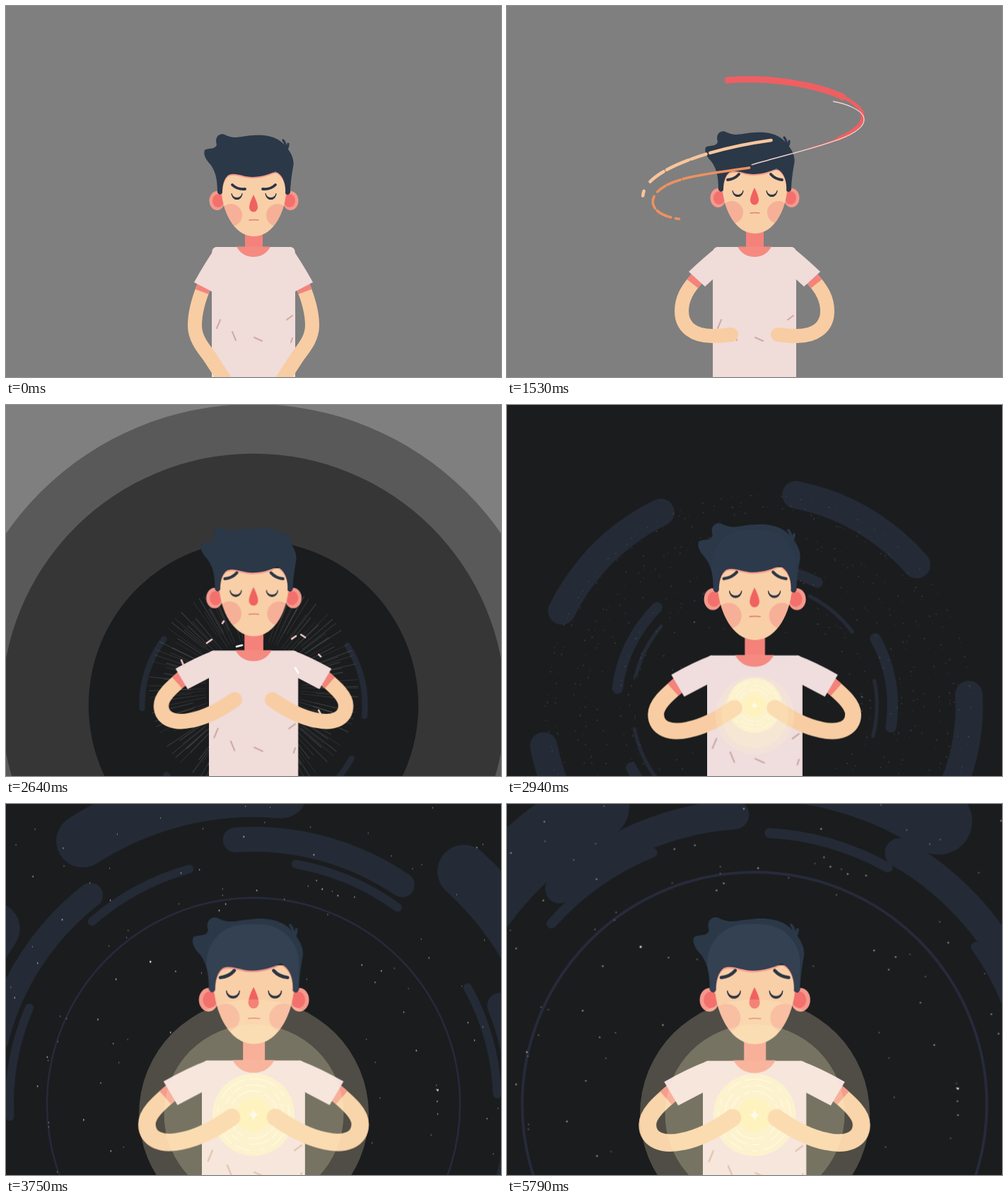
Write an HTML page without scripts that moves like this. It is 700x525 px and loops after 5.82 s.

```html
<!DOCTYPE html>
<html lang="en">
<head>
<meta charset="utf-8">
<title>Inner light</title>
<style>
html, body { margin: 0; width: 100%; height: 100%; overflow: hidden; background: #7f7f7f; }
svg { display: block; width: 100vw; height: 100vh; }
svg * { animation: 5.82s linear infinite; }
.line { fill: none; stroke-linecap: round; }
.space { transform-origin: 350px 425px; }

/* darkness spreading */
.dark1 { fill: #595959; animation-name: dark1; }
.dark2 { fill: #363636; animation-name: dark2; }
.dark3 { fill: #1a1c1e; animation-name: dark3; }
@keyframes dark1 { 0%, 40.5% { r: 0 } 45.36% { r: 425px } 48.5%, 100% { r: 640px } }
@keyframes dark2 { 0%, 41.3% { r: 0 } 45.36% { r: 355px } 49.5%, 100% { r: 640px } }
@keyframes dark3 { 0%, 42.3% { r: 0 } 45.36% { r: 232px } 51.5%, 100% { r: 640px } }

/* orbiting arcs */
.arc { stroke: #242b36; }
.arc, .ring { animation-timing-function: cubic-bezier(.33, .6, .67, .83); }
.wide { stroke-dasharray: 38 37 38 37 38 38 38 35 38 23; animation-name: wide; }
.mid { stroke-dasharray: 38 34; animation-name: mid; }
.thin { stroke-dasharray: 26.2 25.23; animation-name: thin; }
.ring { stroke: #262a3a; animation-name: ring; }
@keyframes wide {
  0%, 42.1% { r: 0; stroke-width: 0; transform: rotate(-442deg) }
  45.36% { r: 157px; stroke-width: 8px; transform: rotate(-332deg) }
  56.19% { r: 386px; stroke-width: 56px; transform: rotate(-171deg) }
  64.43% { r: 444px; stroke-width: 75px; transform: rotate(-123deg) }
  80%, 100% { r: 478px; stroke-width: 95px; transform: rotate(-95deg) }
}
@keyframes mid {
  0%, 45.36% { r: 0; stroke-width: 0; transform: rotate(-333deg) }
  56.19% { r: 305px; stroke-width: 24px; transform: rotate(-83deg) }
  64.43% { r: 375px; stroke-width: 35px; transform: rotate(-22deg) }
  80%, 100% { r: 411px; stroke-width: 42px; transform: rotate(12deg) }
}
@keyframes thin {
  0%, 45.6% { r: 0; stroke-width: 0; transform: rotate(-407deg) }
  56.19% { r: 275px; stroke-width: 8px; transform: rotate(-105.5deg) }
  64.43% { r: 345px; stroke-width: 12px; transform: rotate(-28.7deg) }
  80%, 100% { r: 384.5px; stroke-width: 14px; transform: rotate(16deg) }
}
@keyframes ring {
  0%, 56.19% { r: 225px; stroke-width: 0 }
  64.43% { r: 292px; stroke-width: 2.6px }
  80%, 100% { r: 328.5px; stroke-width: 4px }
}

/* stars */
.stars { stroke: #d9dcdc; animation-name: stars; }
.stars .d1 { stroke-dasharray: 0 71 0 133 0 38 0 157 0 96; stroke-width: 1.3; }
.stars .d2 { stroke-dasharray: 0 117 0 29 0 183 0 64 0 149; stroke-width: 1.8; }
.dust { stroke: #a5a8a5; stroke-width: 1.8; animation-name: dust; }
.dust circle { stroke-dasharray: 2 27 0 49 3 18 0 61 2 11 0 38; }
.comet { fill: #fff; animation-name: comet; }
@keyframes stars {
  0%, 45.5% { transform: scale(.3); opacity: 0 }
  51% { opacity: .8 }
  56.19% { transform: scale(.8); animation-timing-function: ease-out }
  64.43% { transform: scale(.917); opacity: 1; animation-timing-function: ease-out }
  79.9% { transform: none }
  100% { transform: scale(1.013) }
}
@keyframes dust { 0%, 47% { opacity: 0 } 52%, 57% { opacity: .85 } 62%, 100% { opacity: 0 } }
@keyframes comet {
  0%, 77.5% { transform: rotate(-24deg); opacity: 0 }
  79%, 80.3% { opacity: 1 }
  79.9% { transform: none }
  82.3%, 100% { transform: rotate(24deg); opacity: 0 }
}

/* burst around the chest */
.burst { transform-origin: 350px 400px; animation-name: burst; }
.rays { stroke: #77797a; stroke-width: 60; opacity: .38; fill: none; }
@keyframes burst {
  0%, 42% { transform: scale(.5); opacity: 0 }
  44.5% { opacity: 1 }
  45.36% { transform: none; opacity: 1 }
  50%, 100% { transform: scale(1.35); opacity: 0 }
}

/* figure */
.zoom { transform-origin: 350px 248px; animation-name: zoom; }
.head { animation-name: head; }
.low { animation-name: low; }
.lid { fill: #2b3645; stroke: #2b3645; stroke-width: 1.2; }
.brow { stroke: #2b3645; stroke-width: 3.8; animation-name: brow; }
.arm { stroke: #f8cda3; stroke-width: 20; animation-name: arm; }
.cuff { stroke: #f4837b; stroke-width: 20; stroke-dasharray: 13 999; fill: none; animation-name: arm; }
.shirt { fill: #f0dcd9; animation-name: lit; }
.sleeve { animation-name: sleeve, lit; }
.sheen { fill: #435164; animation-name: sheen; }
@keyframes zoom {
  0%, 39.5% { transform: none; animation-timing-function: cubic-bezier(.4, 0, .75, .7) }
  45.36% { transform: scale(1.07) }
  53% { transform: scale(1.178); animation-timing-function: cubic-bezier(.33, .6, .67, .9) }
  56.19% { transform: scale(1.207); animation-timing-function: cubic-bezier(.33, .7, .67, .9) }
  64.43% { transform: scale(1.236) }
  73%, 100% { transform: scale(1.24) }
}
@keyframes head {
  0%, 4% { transform: translateY(4px); animation-timing-function: ease-in-out }
  20% { transform: translateY(-2px); animation-timing-function: ease-in-out }
  26%, 100% { transform: none }
}
@keyframes low {
  0%, 5% { transform: translateY(6px); animation-timing-function: ease-in-out }
  20%, 100% { transform: none }
}
@keyframes brow {
  0%, 6% { d: path("M320 249Q327 256 338 255"); animation-timing-function: ease-in-out }
  20%, 100% { d: path("M312 246Q322 245 328 238") }
}
@keyframes arm {
  0%, 6% { d: path("M282 392C272 415 267 435 267 452C267 470 278 483 287 495C295 507 305 523 315 538"); animation-timing-function: ease-in-out }
  24%, 27% { d: path("M271 383C255 400 247 414 247 432C247 455 265 467 290 467C300 467 310 466 317 465"); animation-timing-function: ease-in-out }
  41%, 100% { d: path("M259 375C240 391 228 402 228 414C228 432 246 438 268 433C288 429 308 418 325 406") }
}
@keyframes sleeve {
  0%, 6% { d: path("M297 341Q282 362 266 391L291 404L305 370Z"); animation-timing-function: ease-in-out }
  24%, 27% { d: path("M297 341Q278 356 257 376L280 397L305 374Z"); animation-timing-function: ease-in-out }
  41%, 100% { d: path("M297 341Q275 349 247 365L263 392L305 370Z") }
}
@keyframes lit { 0%, 48% { fill: #f0dcd9 } 56%, 100% { fill: #f1deea } }
@keyframes sheen { 0%, 48% { opacity: 0 } 56%, 100% { opacity: .38 } }

/* ribbons: --l is the length, --h the head's place when fully drawn */
.ribbon { fill: none; stroke-dasharray: var(--l) 3000; animation-name: ribbon; }
.red { --h: 526; stroke: #ef5f62; }
.peach { --l: 206; --h: 332; stroke: #f8c69c; stroke-width: 4.5; stroke-dasharray: 7 16 24 5 34 4 22 6 88 3000; }
.orange { --l: 200; --h: 206; stroke: #ee9160; stroke-width: 3.6; stroke-dasharray: 5 7 22 4 18 8 14 3 20 4 95 3000; }
.pink { --l: 240; --h: 240; stroke: #f3d2cb; stroke-width: 1.3; }
@keyframes ribbon {
  0%, 15.5% { stroke-dashoffset: calc(var(--l) * 1px + 6px) }
  26.29% { stroke-dashoffset: calc((var(--l) - var(--h)) * 1px) }
  38.5%, 100% { stroke-dashoffset: calc((var(--l) - 3.1 * var(--h)) * 1px) }
}

/* light */
.core { transform-origin: 350px 403px; animation-name: core; }
.spin { transform-origin: 350px 403px; stroke: #fffdf0; stroke-width: 1.3; animation-name: spin; }
.halo { fill: #fff2c8; fill-opacity: .23; }
.h1 { animation-name: halo1; }
.h2 { animation-name: halo2; }
@keyframes core {
  0%, 46.5% { transform: scale(0); animation-timing-function: ease-out }
  54%, 100% { transform: none }
}
@keyframes spin { from { transform: none } to { transform: rotate(360deg) } }
@keyframes halo1 {
  0%, 49% { r: 0; animation-timing-function: ease-out }
  56.19% { r: 143.5px; animation-timing-function: ease-out }
  64.43%, 100% { r: 162.5px }
}
@keyframes halo2 {
  0%, 48% { r: 0; animation-timing-function: ease-out }
  56.19% { r: 122px; animation-timing-function: ease-out }
  64.43%, 100% { r: 127px }
}
</style>
</head>
<body>
<svg viewBox="0 0 700 525" preserveAspectRatio="none">
  <defs>
    <path id="face" d="M305 232V262C307 284 321 322 350.5 322C380 322 394 284 396 262V232Z"/>
    <path id="hair" d="M299 260C299 240 296 230 289 220C281 212 279 205 281 200C287 196 296 200 298 192C294 180 304 174 311 179C325 185 330 180 350 179C375 177 388 185 395 194C405 205 408 215 406 224C404 235 402 250 402 260Q399 266 395 261C396 248 392 235 381 230C372 234 362 238 348 238C335 238 325 231 315 235C308 240 306 250 306 260Q303 266 299 260Z"/>
    <path id="sweep" d="M230 300C250 260 340 230 424 203C470 190 504 175 503 155C500 125 400 98 312 105C200 115 110 150 100 200C90 270 200 300 350 310"/>
    <path id="lid" d="M319 261A7.5 8.5 0 0 0 334 261A7.5 6.6 0 0 1 319 261Z"/>
    <clipPath id="inFace"><use href="#face"/></clipPath>
    <clipPath id="inHair"><use href="#hair"/></clipPath>
    <g id="ear">
      <ellipse cx="298.5" cy="271.5" rx="11" ry="13.5" fill="#f5998d"/>
      <ellipse cx="300" cy="271.5" rx="8" ry="9.5" fill="#f3716c"/>
    </g>
  </defs>

  <rect width="700" height="525" fill="#7f7f7f"/>
  <circle class="dark1" cx="350" cy="425"/>
  <circle class="dark2" cx="350" cy="425"/>
  <circle class="dark3" cx="350" cy="425"/>

  <g class="line">
    <circle class="ring" cx="350" cy="425"/>
    <circle class="arc thin space" cx="350" cy="425" pathLength="360"/>
    <circle class="arc mid space" cx="350" cy="425" pathLength="360"/>
    <circle class="arc wide space" cx="350" cy="425" pathLength="360"/>
  </g>

  <g class="stars space line">
    <circle class="d1" cx="340" cy="415" r="205"/>
    <circle class="d2" cx="372" cy="440" r="262"/>
    <circle class="d1" cx="331" cy="402" r="301"/>
    <circle class="d1" cx="380" cy="431" r="347"/>
    <circle class="d2" cx="322" cy="447" r="388"/>
    <circle class="d1" cx="361" cy="409" r="419"/>
    <circle class="d1" cx="335" cy="428" r="463"/>
    <circle class="d2" cx="376" cy="417" r="502"/>
    <circle class="d1" cx="344" cy="436" r="547"/>
    <path stroke-width="2" d="M297 126h0M307 116h0M456 93h0M480 103h0M138 232h0M110 294h0M222 314h0M547 219h0M32 352h0M443 40h0M335 12h0M55 140h0M601 342h0M517 210h0M17 397h0M130 497h0M88 449h0M355 95h0"/>
    <path stroke="#fff" stroke-width="2.8" d="M191 205h0M634 403h0"/>
    <g class="dust">
      <circle cx="338" cy="431" r="318"/>
      <circle cx="367" cy="419" r="372"/>
      <circle cx="329" cy="412" r="441"/>
      <circle cx="371" cy="438" r="468"/>
      <circle cx="345" cy="420" r="521"/>
      <circle cx="362" cy="429" r="559"/>
    </g>
  </g>
  <path class="comet space" d="M55 224A357 357 0 0 1 152 128A560 560 0 0 0 55 224Z"/>

  <g class="burst">
    <circle class="rays" cx="350" cy="400" r="98" stroke-dasharray="1 6 .6 4 1 11 .7 5"/>
    <circle class="rays" cx="350" cy="400" r="118" stroke-dasharray=".8 9 1 17 .6 7 1 5"/>
  </g>

  <g class="zoom">
    <path d="M338 308H363V345H338Z" fill="#f4827a"/>
    <path class="shirt" d="M297 341H403Q409 342 409 350V600H291V350Q291 342 297 341Z"/>
    <path d="M326 340.5H374Q366 355 350 355Q334 355 326 340.5Z" fill="#f58a80"/>
    <path class="line" stroke="#cfaaa7" stroke-width="2" d="M303 444L298 456M320 461L325 473M351 469L362 474M397 444L405 438M405 470L403 476"/>

    <g class="core">
      <circle cx="350" cy="403" r="47" fill="#fbf2d3"/>
      <g class="spin line">
        <circle cx="350" cy="403" r="41" stroke-dasharray="17 6 31 9 5 12"/>
        <circle cx="350" cy="403" r="34" stroke-dasharray="9 5 22 13"/>
        <circle cx="350" cy="403" r="27" stroke-dasharray="25 7 6 4"/>
      </g>
      <circle cx="350" cy="403" r="19.5" fill="#fdf4b8"/>
      <path d="M350 396Q351 402 356 403Q351 404 350 410Q349 404 344 403Q349 402 350 396Z" fill="#fff"/>
    </g>

    <g>
      <path class="arm line"/>
      <path class="cuff"/>
      <path class="shirt sleeve"/>
    </g>
    <g transform="matrix(-1 0 0 1 700 0)">
      <path class="arm line"/>
      <path class="cuff"/>
      <path class="shirt sleeve"/>
    </g>

    <g class="head">
      <use href="#ear"/>
      <use href="#ear" transform="matrix(-1 0 0 1 701 0)"/>
      <use href="#face" fill="#f9cfa8"/>
      <g clip-path="url(#inFace)">
        <g fill="#f4a08f" fill-opacity=".65">
          <circle cx="318" cy="292" r="16"/>
          <circle cx="384" cy="292" r="16"/>
        </g>
        <use href="#hair" y="2" fill="#f49a8b"/>
      </g>
      <g>
        <use href="#lid" class="lid"/>
        <path class="brow line"/>
      </g>
      <g transform="matrix(-1 0 0 1 701 0)">
        <use href="#lid" class="lid"/>
        <path class="brow line"/>
      </g>
      <g class="low">
        <path d="M350 257C354 265 356 271 356 275A6 6.5 0 0 1 344 275C344 271 346 265 350 257Z" fill="#f0625f"/>
        <path class="line" d="M344 293Q350 292 357 293" stroke="#e0806f" stroke-width="1.4"/>
      </g>
      <use href="#hair" fill="#2b3848"/>
      <path class="line" d="M396 200Q396 191 392 186M396 200Q399 196 399 191" stroke="#2b3848" stroke-width="3.2"/>
      <g clip-path="url(#inHair)">
        <rect class="sheen" x="296" y="185" width="106" height="110" rx="44"/>
      </g>
    </g>
  </g>

  <g class="burst line" stroke-width="2.6" stroke="#f0c9c2">
    <path d="M248 361L251 368M284 337L291 332M404 331L410 327M417 325L423 329M442 353L445 356M442 432L445 438M306 309L308 306"/>
    <path stroke="#fff" d="M326 342L334 340M409 372L413 379"/>
  </g>

  <g>
    <g class="red">
      <use href="#sweep" class="ribbon" style="--l:304" stroke-width="2"/>
      <use href="#sweep" class="ribbon" style="--l:262" stroke-width="5"/>
      <use href="#sweep" class="ribbon" style="--l:172" stroke-width="9"/>
    </g>
    <path class="ribbon peach" stroke-linecap="round" d="M300 320C230 310 185 290 193 264C200 232 285 202 374 190C450 175 560 160 570 200C575 240 450 260 380 280"/>
    <path class="ribbon orange" stroke-linecap="round" d="M250 302C195 298 190 262 245 246C270 238 310 234 342 229C450 210 540 240 520 290"/>
    <path class="ribbon pink" d="M345 225C430 200 515 185 504 156C500 147 480 138 461 135"/>
  </g>

  <circle class="halo h1" cx="350.5" cy="439"/>
  <circle class="halo h2" cx="350.5" cy="439"/>
</svg>
</body>
</html>
```
